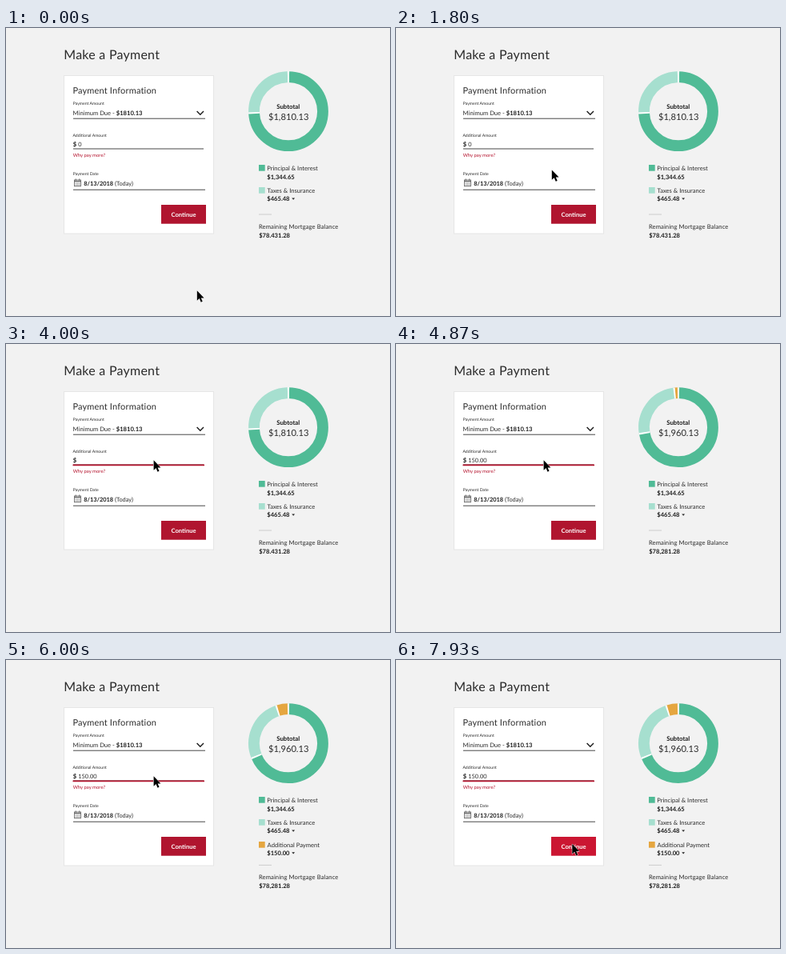
Write an HTML page that moves like this. It is 480 px wide and 360 px high and loops after 8000 ms.

```html
<!DOCTYPE html>
<html lang="en">
<head>
<meta charset="utf-8">
<title>Make a Payment</title>
<style>
  html, body { margin: 0; width: 100%; height: 100%; overflow: hidden; background: #f2f2f2; }
  svg { display: block; width: 100vw; height: 100vh; }
  text { font: 7.6px Lato, "Open Sans", sans-serif; fill: #2b2b2b; text-rendering: geometricPrecision; white-space: pre; }
  .bold { font-weight: 700; fill: #1c1c1c; }
  .title { font-size: 16px; letter-spacing: .25px; }
  .heading { font-size: 11px; letter-spacing: .17px; }
  .label { font-size: 5.15px; }
  .hint { font-size: 5.95px; fill: #b5152f; }
  .entry { font-size: 7.4px; }
  .total { font-size: 11.2px; }
  .rule { stroke: #333; stroke-width: .9; }
  .ring circle { fill: none; stroke-width: 13.8; }
</style>
</head>
<body>
<svg viewBox="0 0 480 360">
  <defs>
    <clipPath id="rowClip"><rect id="rowWindow" x="310" y="225.5" width="120" height="0"/></clipPath>
    <path id="caret" d="M357.3 0h3.8l-1.9 2.3z" fill="#222"/>
  </defs>

  <text class="title" x="72.3" y="39.3">Make a Payment</text>

  <rect x="72.5" y="59.5" width="187" height="197.5" fill="#fff" stroke="#e6e6e6"/>
  <text class="heading" x="83.4" y="81.7">Payment Information</text>

  <text class="label" x="83.7" y="96.3">Payment Amount</text>
  <text x="83.6" y="109">Minimum Due - <tspan class="bold">$1810.13</tspan></text>
  <path d="M238.6 104l4.2 4.3 4.2-4.3" fill="none" stroke="#1c1c1c" stroke-width="1.4"/>
  <path class="rule" d="M84 113.2H249"/>

  <text class="label" x="83.4" y="136.3">Additional Amount</text>
  <text class="bold" x="83.8" y="148">$</text>
  <text class="entry" id="zero" x="90.3" y="148">0</text>
  <text class="entry" id="typed" x="90.3" y="148"></text>
  <path class="rule" d="M84 151H247"/>
  <path id="focusLine" d="M83.5 151.4H248" stroke="#b5152f" stroke-width="1.6"/>
  <text class="hint" x="83.7" y="160.7">Why pay more?</text>

  <text class="label" x="83.7" y="184.2">Payment Date</text>
  <g fill="none" stroke="#666">
    <rect x="85.5" y="190" width="8" height="7.7" stroke-width=".9"/>
    <path d="M85.5 191.6h8M87.3 188.5v2M91.7 188.5v2" stroke-width="1.1"/>
    <path d="M87 194h5.2M87 196h5.2" stroke-width="1" stroke-dasharray="1.2 .8"/>
  </g>
  <text class="entry" x="97.2" y="197"><tspan class="bold">8/13/2018</tspan> (Today)</text>
  <path class="rule" d="M84 202.2H249"/>

  <rect id="button" x="194" y="221" width="56" height="23.7"/>
  <text x="222" y="235.6" text-anchor="middle" style="fill:#fff;font-weight:700">Continue</text>

  <g class="ring" id="ring" transform="translate(353 104.2) rotate(-90)"></g>
  <text class="bold" x="352.7" y="100.5" text-anchor="middle" style="font-size:7.8px">Subtotal</text>
  <text class="total" id="total" x="353.2" y="115" text-anchor="middle"></text>

  <rect x="316" y="171" width="7.7" height="7.7" fill="#50bb96"/>
  <text x="326.2" y="178">Principal &amp; Interest</text>
  <text class="bold" x="326.3" y="188.6">$1,344.65</text>

  <rect x="316" y="199" width="7.7" height="7.7" fill="#a6dfcf"/>
  <text x="326.6" y="206">Taxes &amp; Insurance</text>
  <text class="bold" x="326.3" y="216.2">$465.48</text>
  <use href="#caret" y="212.5"/>

  <g clip-path="url(#rowClip)">
    <rect x="316" y="227" width="7.7" height="7.7" fill="#e5a640"/>
    <text x="326.6" y="234">Additional Payment</text>
    <text class="bold" x="326.3" y="244">$150.00</text>
    <use href="#caret" y="240.3"/>
  </g>

  <g id="balance">
    <path d="M316 233H332" stroke="#ccc"/>
    <text x="316" y="251" style="letter-spacing:.1px">Remaining Mortgage Balance</text>
    <text class="bold" id="balanceValue" x="316.2" y="261.6"></text>
  </g>

  <path id="cursor" d="M0 0V12.4L2.9 9.8 4.9 14.4 6.9 13.5 5 9.1H8.8Z" fill="#000" stroke="#fff" stroke-width="1" paint-order="stroke"/>
</svg>
<script>
const LOOP = 8000;
const $ = id => document.getElementById(id);
const mix = (a, b, k) => a + (b - a) * k;
const ramp = (t, from, to) => Math.min(1, Math.max(0, (t - from) / (to - from)));
const ease = k => k * k * (3 - 2 * k);

// time, x, y of the pointer tip
const cursorPath = [
  [0, 238.8, 328.3], [870, 238.8, 328.3], [1130, 215.3, 254.3], [1670, 194.3, 201],
  [1800, 194.8, 177.5], [2400, 184.6, 145.3], [6700, 184.6, 145.3],
  [7200, 189.2, 158.3], [7530, 199.5, 193.5], [7930, 220.3, 230], [LOOP, 220.3, 230]
];

function cursorAt(t) {
  const i = Math.max(1, cursorPath.findIndex(p => p[0] >= t));
  const [a, b] = [cursorPath[i - 1], cursorPath[i]];
  const k = ramp(t, a[0], b[0]);
  return [mix(a[1], b[1], k), mix(a[2], b[2], k)];
}

function addArc(color) {
  const circle = document.createElementNS('http://www.w3.org/2000/svg', 'circle');
  circle.setAttribute('r', 43);
  circle.setAttribute('pathLength', 360);
  circle.setAttribute('stroke', color);
  $('ring').append(circle);
  return (from, to) => {
    const span = Math.max(0, to - from);
    circle.setAttribute('stroke-dasharray', `${span} ${360 - span}`);
    circle.setAttribute('transform', `rotate(${from})`);
    circle.style.display = span ? '' : 'none';
  };
}

const principal = addArc('#50bb96');
const taxes = addArc('#a6dfcf');
const additional = addArc('#e5a640');
const gaps = [addArc('#fff'), addArc('#fff'), addArc('#fff')];

function drawRing(k) {
  const taxStart = mix(267.4, 248, k);
  const extraStart = mix(360, 342, k);
  principal(0, taxStart);
  taxes(taxStart, extraStart);
  additional(extraStart, 360);
  [0, taxStart, extraStart].forEach((angle, i) => gaps[i](angle - 1.3, angle + 1.3));
}

function draw(t) {
  $('cursor').setAttribute('transform', `translate(${cursorAt(t)})`);

  const hover = ramp(t, 1230, 1360) - ramp(t, 1600, 1800) + ramp(t, 7780, 7920);
  const [r, g, b] = [mix(176, 203, hover), mix(21, 22, hover), mix(47, 50, hover)];
  $('button').setAttribute('fill', `rgb(${r},${g},${b})`);

  const focus = ramp(t, 3300, 3800);
  $('focusLine').setAttribute('opacity', focus);
  $('zero').setAttribute('opacity', 1 - focus);
  $('typed').textContent = '150.00'.slice(0, Math.max(0, Math.floor((t - 4000) / 55)));

  drawRing(ease(ramp(t, 4700, 5130)));
  const updated = t >= 4800;
  $('total').textContent = updated ? '$1,960.13' : '$1,810.13';
  $('balanceValue').textContent = updated ? '$78,281.28' : '$78.431.28';

  const shift = 23.4 * ease(ramp(t, 4930, 5470));
  $('rowWindow').setAttribute('height', shift);
  $('balance').setAttribute('transform', `translate(0 ${shift})`);
}

const start = performance.now();
function tick() {
  draw((performance.now() - start) % LOOP);
  requestAnimationFrame(tick);
}
tick();
</script>
</body>
</html>
```
